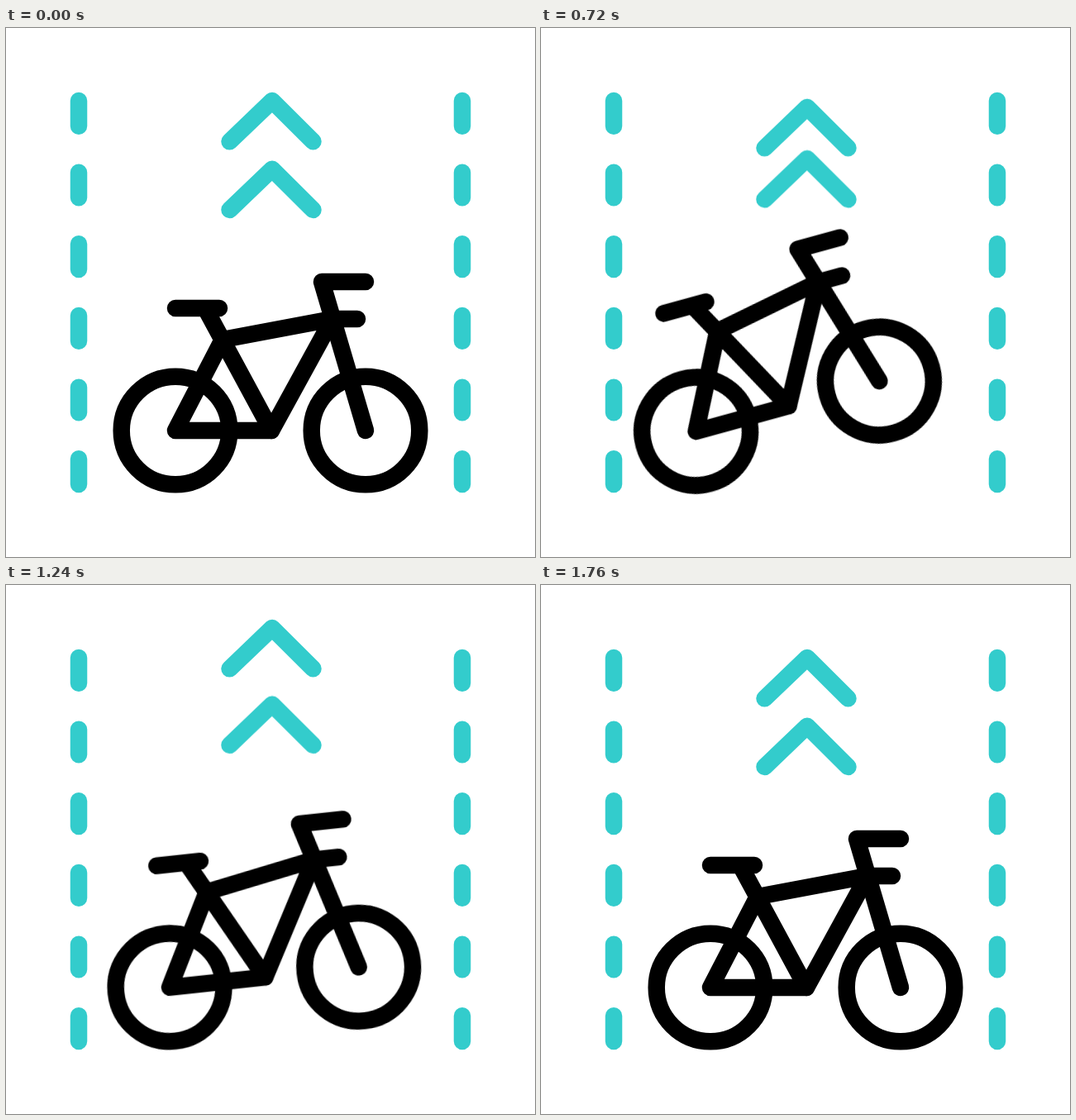
An HTML page for the animation above (1960 ms loop, 640 by 640 pixels).

```html
<!DOCTYPE html>
<html lang="en">
<head>
<meta charset="utf-8">
<title>Bike lane</title>
<style>
  html, body { margin: 0; width: 100%; height: 100%; overflow: hidden; background: #fff; }
  svg { display: block; width: 100vw; height: 100vh; }
  path, circle {
    fill: none;
    stroke-width: 20.5;
    stroke-linecap: round;
    stroke-linejoin: round;
  }
  .lane { stroke: #3cc; }
  .dash { stroke-dasharray: 30.7 55.96; }
  .bike { stroke: #000; transform-origin: 200px 552px; }
  .bike, .chevron { animation: 1960ms cubic-bezier(.5, 0, .5, 1) infinite; }
  .bike { animation-name: wheelie; }
  .upper { animation-name: upper; }
  .lower { animation-name: lower; }

  @keyframes wheelie {
    0% { transform: rotate(0deg); }
    25.51% { transform: rotate(-16.9deg); }
    55.1% { transform: rotate(-11.25deg); }
    72.19% { transform: rotate(0deg); }
    81.12% { transform: rotate(-4.2deg); }
    89.8%, 100% { transform: rotate(0deg); }
  }
  @keyframes upper {
    0%, 6.12% { transform: translateY(0); }
    28.57% { transform: translateY(15.5px); }
    57.3% { transform: translateY(-38.5px); }
    87.24%, 100% { transform: translateY(0); }
  }
  @keyframes lower {
    0% { transform: translateY(0); }
    22.45% { transform: translateY(15.5px); }
    50.41% { transform: translateY(-38.5px); }
    82.14%, 100% { transform: translateY(0); }
  }
</style>
</head>
<body>
<svg viewBox="0 0 640 640">
  <g class="lane">
    <path class="dash" d="M88 88V552"/>
    <path class="dash" d="M552 88V552"/>
    <path class="chevron upper" d="M270.5 137.3 322 88 371.5 137.3"/>
    <path class="chevron lower" d="M270.5 220 322 170.7 371.5 220"/>
  </g>
  <g class="bike">
    <circle cx="205" cy="487" r="65.3"/>
    <circle cx="435" cy="487" r="65.3"/>
    <path d="M205 339H258M241 339 321 487"/>
    <path d="M205 487 262 377 395 352 321 487Z"/>
    <path d="M435 307H382L435 487M395 352H425"/>
  </g>
</svg>
<script>
  // Advance the CSS animations in 40 ms steps.
  const LOOP = 1960, STEP = 40;
  const animations = document.getAnimations();
  animations.forEach(a => a.pause());

  function tick() {
    const time = Math.floor(performance.now() % LOOP / STEP) * STEP;
    for (const a of animations) a.currentTime = time;
    requestAnimationFrame(tick);
  }
  tick();
</script>
</body>
</html>
```
